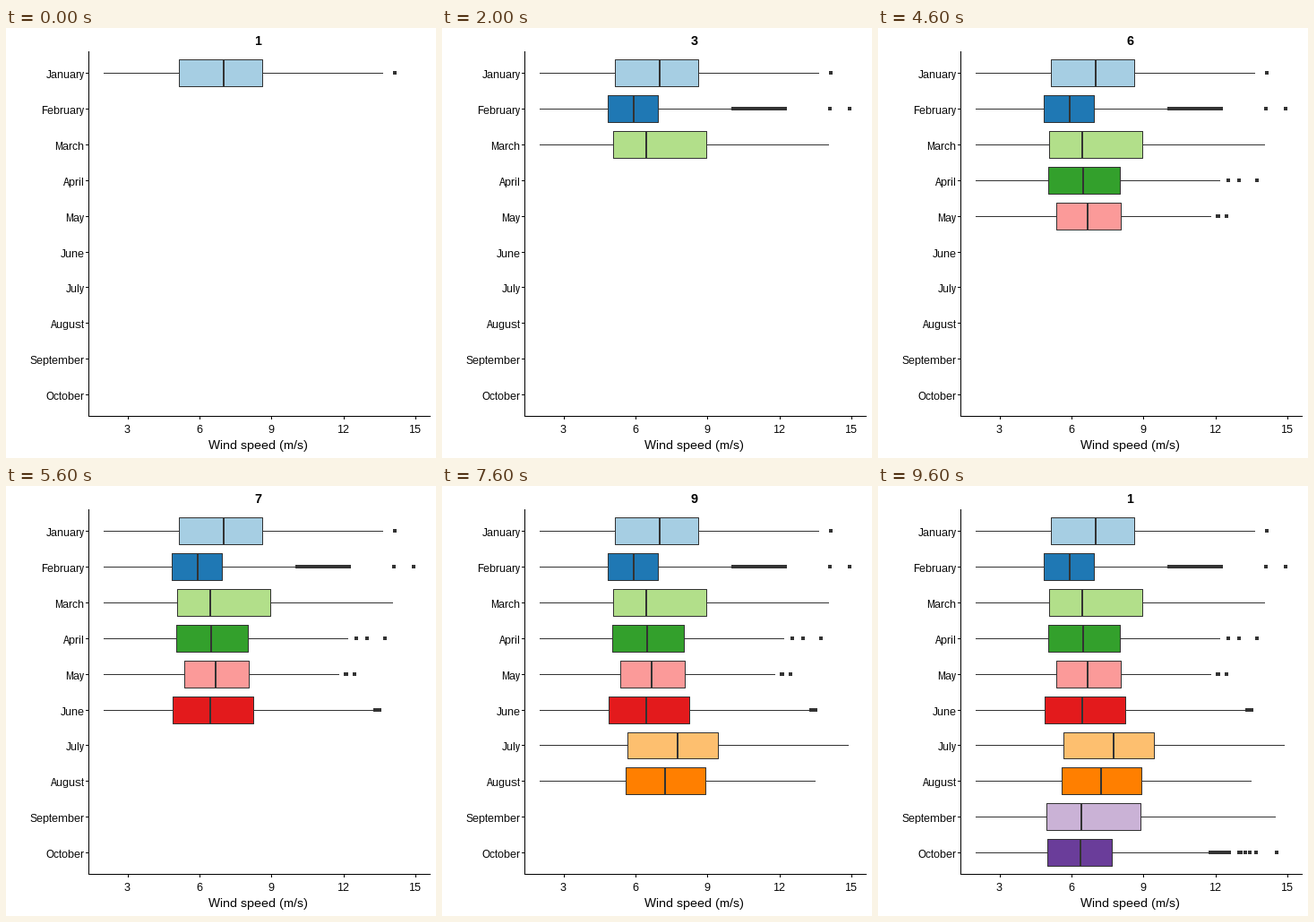
A matplotlib script for the animation above (10 s loop, 480x480 px).

```python
from math import floor

import matplotlib.pyplot as plt
from matplotlib.animation import FuncAnimation
from matplotlib.patches import Circle, Rectangle

SIZE = 480
PX = 0.75  # points per pixel at 96 dpi
INK = "#333333"
LEFT, RIGHT, TOP, BOTTOM = 92, 474, 26, 433
ROW_STEP = 39.9
LOW = 109  # where every whisker starts
plt.rcParams.update({
    "font.family": "Liberation Sans",
    "path.snap": False,
    "text.hinting": "native",
    "text.hinting_factor": 1,
})

# lower quartile, median, upper quartile, end of whisker
MONTHS = {
    "January": (193, 242.5, 286, 420),
    "February": (185, 213.5, 241, 322),
    "March": (191, 227.5, 295, 431),
    "April": (190, 228.5, 270, 381),
    "May": (199, 233.5, 271, 371),
    "June": (186, 227.5, 276, 409),
    "July": (207, 262.5, 308, 453),
    "August": (205, 248.5, 294, 416),
    "September": (188, 226.5, 293, 443),
    "October": (189, 225.5, 261, 368),
}
# runs of outliers that thin out to the right: first, last, count
OUTLIERS = {
    "January": [(433, 433, 1)],
    "February": [(324, 382, 24), (432, 454, 2)],
    "April": [(390, 422, 3)],
    "May": [(378, 379, 2), (388, 388, 1)],
    "June": [(411, 416, 4)],
    "October": [(370, 391, 11), (402, 421, 5), (444, 444, 1)],
}

fig = plt.figure(figsize=(5, 5), dpi=96, facecolor="white")
ax = fig.add_axes([0, 0, 1, 1])
ax.set_xlim(-0.5, SIZE - 0.5)  # whole numbers are pixel centres
ax.set_ylim(SIZE - 0.5, -0.5)
ax.axis("off")


def line(x0, y0, x1, y1, color="black", width=1, z=1):
    return ax.plot([x0, x1], [y0, y1], color=color, lw=width * PX,
                   solid_capstyle="butt", zorder=z)[0]


def label(x, baseline, text, size, ha="center", weight="normal"):
    return ax.text(x, baseline, text, fontsize=size * PX, ha=ha,
                   va="baseline", weight=weight, color="black")


def row_y(k, offset=0):
    return floor(50.58 + ROW_STEP * (k + offset))


def thinning(first, last, count):
    for j in range(count):
        u = j / max(count - 1, 1)
        yield floor(first + (last - first) * u ** 1.4) + 0.5


def box_plot(k, month):
    left, median, right, high = MONTHS[month]
    y, top, bottom = row_y(k), row_y(k, -0.375), row_y(k, 0.375)
    fill = plt.get_cmap("Paired")(k)
    box = Rectangle((left, top), right - left, bottom - top, facecolor=fill,
                    edgecolor=INK, lw=PX, joinstyle="round", zorder=3)
    parts = [
        line(LOW - 0.5, y, high + 0.5, y, INK, z=2),
        ax.add_patch(box),
        line(median, top, median, bottom, INK, 2, 4),
    ]
    for run in OUTLIERS.get(month, []):
        for x in thinning(*run):
            dot = Circle((x, y - 0.5), 1.9, facecolor=INK, lw=0,
                         antialiased=False, zorder=4)
            parts.append(ax.add_patch(dot))
    return parts


line(LEFT, TOP - 0.5, LEFT, BOTTOM + 0.5)
line(LEFT - 0.5, BOTTOM, RIGHT - 0.5, BOTTOM)
for k, month in enumerate(MONTHS):
    y = row_y(k)
    line(LEFT - 3.5, y, LEFT, y)
    label(87, y + 5.5, month, 12, ha="right")
for speed in range(3, 16, 3):
    x = floor(55.65 + 26.8 * speed)
    line(x, BOTTOM, x, BOTTOM + 3.5)
    label(x - 1, 451.5, str(speed), 12)
label(281, 469.5, "Wind speed (m/s)", 14)
title = label(281, 18.5, "1", 14, weight="bold")
rows = [box_plot(k, month) for k, month in enumerate(MONTHS)]


def update(i):
    # five frames per month; the title runs two frames ahead of the boxes
    title.set_text(str((i + 2) // 5 % len(rows) + 1))
    for k, parts in enumerate(rows):
        for part in parts:
            part.set_visible(k <= i // 5)
    return [title, *sum(rows, [])]


anim = FuncAnimation(fig, update, frames=50, interval=200, repeat=True,
                     repeat_delay=0, blit=False)
plt.show()
```
